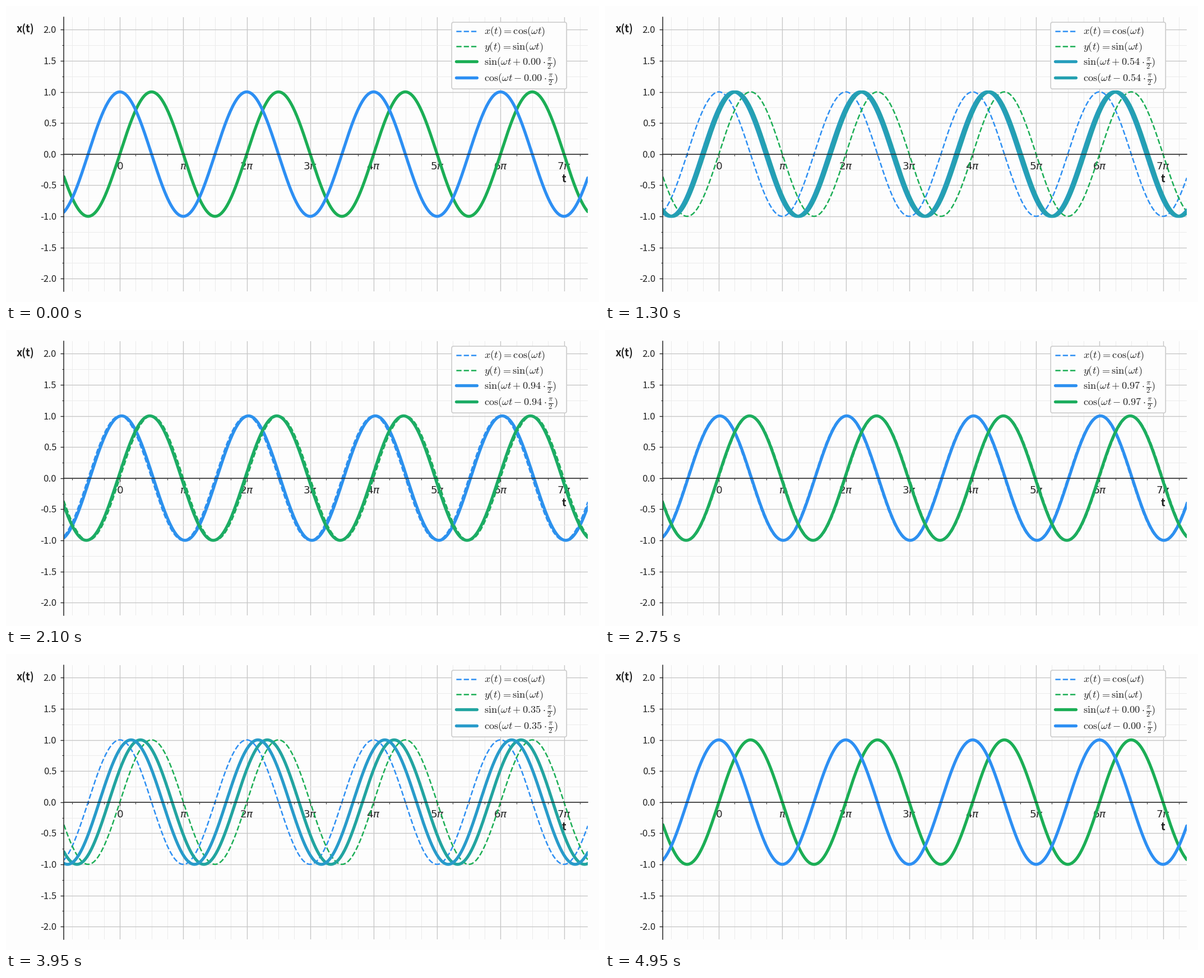
Write a matplotlib script that moves like this. It is 1058 px wide and 529 px high and loops after 5 s.

```python
import numpy as np
import matplotlib.pyplot as plt
from matplotlib.animation import FuncAnimation
from matplotlib.lines import Line2D
from matplotlib.patches import FancyBboxPatch
from matplotlib.ticker import MultipleLocator, NullFormatter
from matplotlib.transforms import Affine2D

W, H, DPI = 1058, 529, 120
FRAMES, INTERVAL = 100, 50
BG, INK = "#fdfdfd", "#222222"
BLUE = np.array([45, 143, 243]) / 255
GREEN = np.array([27, 174, 85]) / 255
SANS = "Noto Sans CJK JP"

# Plot area in pixels, measured from the top left
LEFT, RIGHT, TOP, BOTTOM = 103.3, 1038, 20, 509.5
X_ZERO, X_UNIT = 203.1, 113.2  # one unit is pi
Y_ZERO, Y_UNIT = 264.7, 111.2

fig = plt.figure(figsize=(W / DPI, H / DPI), dpi=DPI, facecolor=BG)
px = Affine2D().scale(1 / W, -1 / H).translate(0, 1) + fig.transFigure

ax = fig.add_axes([LEFT / W, 1 - BOTTOM / H, (RIGHT - LEFT) / W, (BOTTOM - TOP) / H],
                  facecolor=BG)
ax.set_xlim((LEFT - X_ZERO) / X_UNIT, (RIGHT - X_ZERO) / X_UNIT)
ax.set_ylim((Y_ZERO - BOTTOM) / Y_UNIT, (Y_ZERO - TOP) / Y_UNIT)


def style_axes():
    ax.set_axisbelow(True)
    ax.spines[["top", "right"]].set_visible(False)
    ax.spines["bottom"].set_position("zero")
    for side in ("left", "bottom"):
        ax.spines[side].set(color=INK, linewidth=0.9)
    for axis, major, minor in ((ax.xaxis, 1, 0.25), (ax.yaxis, 0.5, 0.25)):
        axis.set_major_locator(MultipleLocator(major))
        axis.set_minor_locator(MultipleLocator(minor))
        axis.set_major_formatter(NullFormatter())
    ax.tick_params(which="both", color=INK)
    ax.grid(which="major", color="#c6c6c6", linewidth=0.8)
    ax.grid(which="minor", color="#ebebeb", linewidth=0.6)


def label(x, y, text, size=10, **kw):
    return ax.text(x, y, text, transform=px, fontsize=size, color=INK,
                   zorder=0.6, va="baseline", **kw)


def draw_labels():
    for v in np.arange(-2, 2.1, 0.5):
        label(90, Y_ZERO - v * Y_UNIT + 6, f"{v:.1f}", ha="right", family=SANS)
    for n in range(8):
        text = "$0$" if n == 0 else rf"${n if n > 1 else ''}\pi$"
        label(X_ZERO + n * X_UNIT, 291.7, text, 11, ha="center",
              math_fontfamily="dejavusans")
    bold = dict(ha="center", family=SANS, weight="bold")
    label(34.8, 46.8, "x(t)", 11, **bold)
    label(995.3, 315, "t", 11, **bold)


def blend(a, b, p):
    return np.sqrt((1 - p) * a ** 2 + p * b ** 2)


def sin_label(p):
    return rf"$\sin(\omega t + {p:.2f} \cdot \frac{{\pi}}{{2}})$"


def cos_label(p):
    return rf"$\cos(\omega t - {p:.2f} \cdot \frac{{\pi}}{{2}})$"


def legend_row(y, baseline, text, **style):
    key = Line2D([802.5, 839.5], [y, y], transform=px, zorder=3, **style)
    fig.add_artist(key)
    note = fig.text(853.3, baseline, text, transform=px, fontsize=11, color=INK,
                    va="baseline", zorder=3, math_fontfamily="cm")
    return key, note


style_axes()
draw_labels()

t = np.linspace(*ax.get_xlim(), 1000)
dashed = dict(linestyle="--", linewidth=1.5)
thick = dict(linewidth=3.2, solid_capstyle="round")
ax.plot(t, np.cos(np.pi * t), color=BLUE, **dashed)
ax.plot(t, np.sin(np.pi * t), color=GREEN, **dashed)
sin_line, = ax.plot(t, t, color=GREEN, **thick)
cos_line, = ax.plot(t, t, color=BLUE, **thick)

fig.add_artist(FancyBboxPatch((798.7, 32.5), 198, 112.2, transform=px,
                              boxstyle="round,pad=3.5,rounding_size=3.5",
                              facecolor=BG, edgecolor="#cccccc",
                              linewidth=1, zorder=2))
legend_row(44.5, 50.5, r"$x(t) = \cos(\omega t)$", color=BLUE, **dashed)
legend_row(72, 78, r"$y(t) = \sin(\omega t)$", color=GREEN, **dashed)
sin_key, sin_note = legend_row(99, 105.3, sin_label(0), color=GREEN, **thick)
cos_key, cos_note = legend_row(128, 134, cos_label(0), color=BLUE, **thick)


def update(i):
    p = np.sin(np.pi * i / (FRAMES - 1)) ** 2
    shift = p * np.pi / 2
    sin_line.set_ydata(np.sin(np.pi * t + shift))
    cos_line.set_ydata(np.cos(np.pi * t - shift))
    for artist in (sin_line, sin_key):
        artist.set_color(blend(GREEN, BLUE, p))
    for artist in (cos_line, cos_key):
        artist.set_color(blend(BLUE, GREEN, p))
    sin_note.set_text(sin_label(p))
    cos_note.set_text(cos_label(p))
    return sin_line, cos_line, sin_key, cos_key, sin_note, cos_note


anim = FuncAnimation(fig, update, frames=FRAMES, interval=INTERVAL,
                     repeat=True, repeat_delay=0, blit=False)
plt.show()
```
